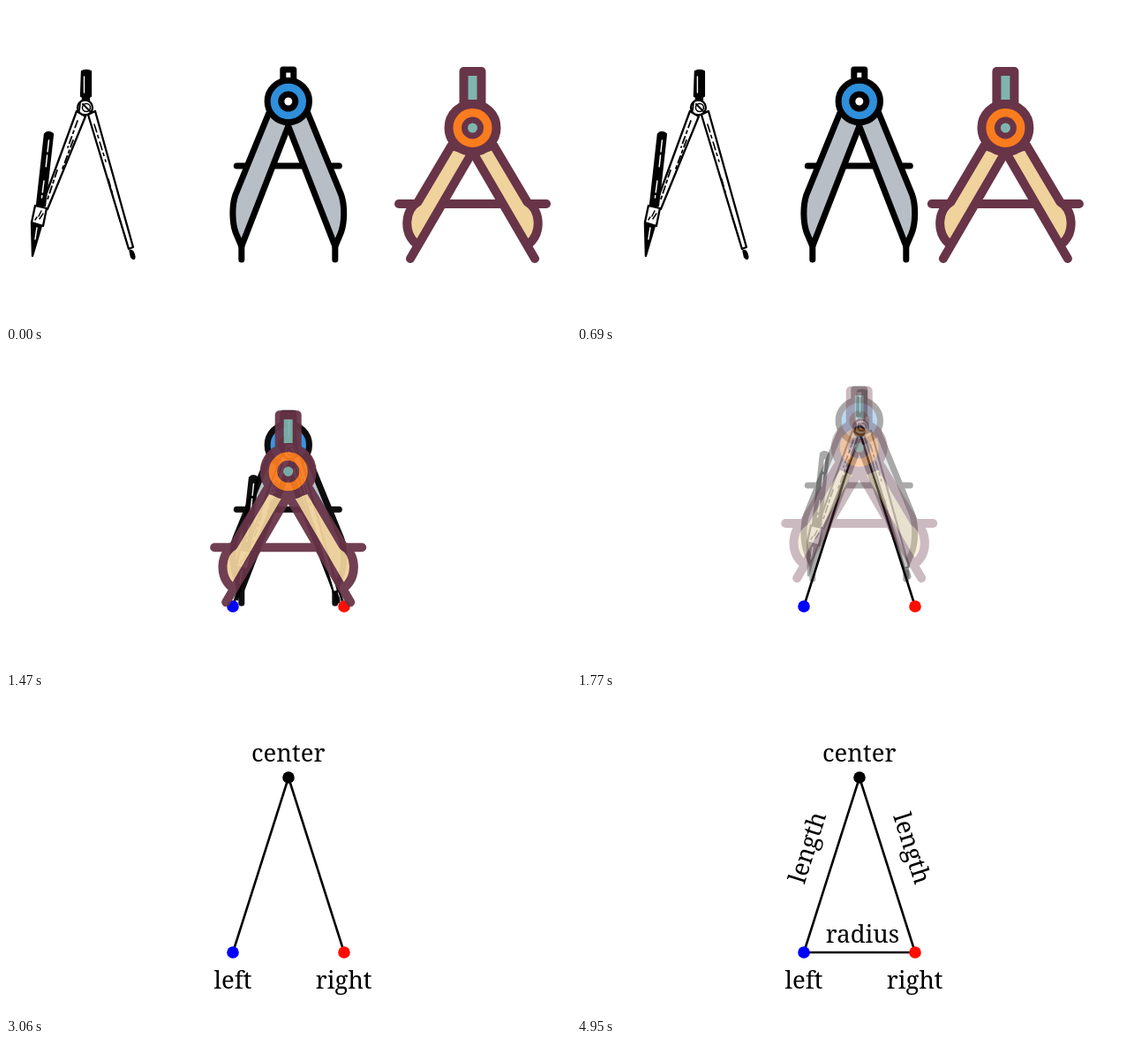
Recreate the animation shown at these times as an HTML page. Size 640 px wide and 360 px high, loop 5.22 s.

```html
<!DOCTYPE html>
<html lang="en">
<head>
<meta charset="utf-8">
<title>Compass</title>
<style>
  html, body { margin: 0; width: 100%; height: 100%; overflow: hidden; background: #fff; }
  svg { display: block; width: 100vw; height: 100vh; }
  text { font: 27.5px "Noto Serif", serif; text-anchor: middle; }
  .round { stroke-linecap: round; stroke-linejoin: round; }
</style>
</head>
<body>
<svg viewBox="0 0 640 360">
  <defs>
    <g id="blueLeg">
      <path d="M-22 121 L-60 214 C-64 226 -64 246 -59 258 L-53 272 L0 136" fill="#b7bec5"/>
      <path d="M-53 272 V287"/>
    </g>
    <path id="tanLeg" fill="#f0d29c"
      d="M-70.5 286 L0 165 L-24 158 L-62 222 C-76 230 -80 256 -63 270"/>
  </defs>

  <g id="diagram" stroke="#000" stroke-width="2.6">
    <path d="M257 288 L320 90 L383 288" fill="none"/>
    <line id="base" x1="257" y1="288" x2="257" y2="288"/>
    <g stroke="none">
      <circle cx="320" cy="90" r="6.8"/>
      <circle cx="257" cy="288" r="6.8" fill="#00f"/>
      <circle cx="383" cy="288" r="6.8" fill="#ff0d00"/>
    </g>
  </g>

  <g id="names">
    <text x="319.7" y="72">center</text>
    <text x="257" y="329">left</text>
    <text x="382.7" y="329">right</text>
  </g>
  <g id="lengths">
    <text transform="translate(270 172) rotate(-72.3)">length</text>
    <text transform="translate(370.5 173) rotate(72.3)">length</text>
  </g>
  <text id="radius" x="323.5" y="276.5">radius</text>

  <g id="blue" class="round" stroke="#000" stroke-width="7" fill="none">
    <path d="M-58.5 181 H57.5"/>
    <use href="#blueLeg"/>
    <use href="#blueLeg" transform="scale(-1 1)"/>
    <rect x="-6" y="72" width="12" height="14" fill="#fff"/>
    <circle cy="108" r="23.7" fill="#2f8fdb"/>
    <circle cy="108" r="8" fill="#fff"/>
  </g>

  <g id="sketch" class="round" stroke="#000" stroke-width="2.3" fill="#fff">
    <path d="M93 123 L101 119 L144 273 L139 275 Z"/>
    <path d="M100 134 L113 176 M116 196 L121 214 M127 236 L137 268" stroke-width="1.6" stroke-dasharray="9 4 3 5"/>
    <path d="M140.5 277 Q144 276 145.5 284 Q145 288 142 284 Z" fill="#000"/>
    <path d="M80 119 L90 125 L47 230 L40 228 Z"/>
    <path d="M81 130 L70 160 M76 152 L64 184 M58 186 L46 222" stroke-width="1.8" stroke-dasharray="8 4 3 4"/>
    <path d="M44 145 Q48 141 53 145 L44 226 H35 Z" fill="#000"/>
    <path d="M48.5 152 L45 184 M43 198 L40.5 217" stroke="#fff" stroke-width="1.5" stroke-dasharray="13 4"/>
    <path d="M33 226 L46 229 L42 249 L29 245 Z"/>
    <path d="M37 238 L40 232 M38 241 L42 235 M33 242 L35 239" stroke-width="1.5"/>
    <path d="M29 246 L40 249 L30 283 Z" fill="#000"/>
    <path d="M35 251 L33 264" stroke="#fff" stroke-width="1.5"/>
    <path d="M87 100 H94 V109 H87 Z" fill="#000"/>
    <circle cx="89.5" cy="115" r="8.5"/>
    <circle cx="91" cy="115" r="4.5" stroke-width="1.5"/>
    <path d="M87 111 L95 119 M84 109 L83 118" stroke-width="2"/>
    <path d="M86 74 Q91 72 96 74 L96 102 Q90 105 85 102 Z" fill="#000"/>
    <path d="M88.5 80 V98" stroke="#fff" stroke-width="1.4"/>
  </g>

  <g id="purple" class="round" stroke="#683448" stroke-width="10" fill="none">
    <path d="M-83.5 224 H83.5"/>
    <use href="#tanLeg"/>
    <use href="#tanLeg" transform="scale(-1 1)"/>
    <rect x="-10" y="74" width="20" height="37" fill="#7fb5ae"/>
    <circle cy="138" r="27" fill="#fa7c1e"/>
    <circle cy="138" r="9" stroke-width="7" fill="#7fb5ae"/>
  </g>
</svg>
<script>
const LOOP = 5220, LEAD = 360, STEP = 900;
const el = id => document.getElementById(id);
const sigmoid = x => 1 / (1 + Math.exp(-x));

// Eased progress of the n-th step, 0 to 1
function phase(t, n) {
  const p = Math.min(1, Math.max(0, (t - LEAD) / STEP - n));
  const edge = sigmoid(-5);
  return (sigmoid(10 * (p - 0.5)) - edge) / (1 - 2 * edge);
}

function place(id, x, leave) {
  el(id).setAttribute("transform", `translate(${x} ${-45 * leave})`);
  el(id).setAttribute("opacity", 1 - leave);
}

function draw(t) {
  const [gather, leave, names, lengths, radius] = [0, 1, 2, 3, 4].map(n => phase(t, n));
  place("blue", 319.8, leave);
  place("sketch", 232 * gather, leave);
  place("purple", 528.5 - 208.8 * gather, leave);
  el("diagram").setAttribute("opacity", t < LEAD + STEP ? 0 : 1);
  el("names").setAttribute("opacity", names);
  el("lengths").setAttribute("opacity", lengths);
  el("radius").setAttribute("opacity", radius);
  el("base").setAttribute("x2", 257 + 126 * radius);
}

const start = performance.now();
function tick() {
  draw((performance.now() - start) % LOOP);
  requestAnimationFrame(tick);
}
tick();
</script>
</body>
</html>
```
